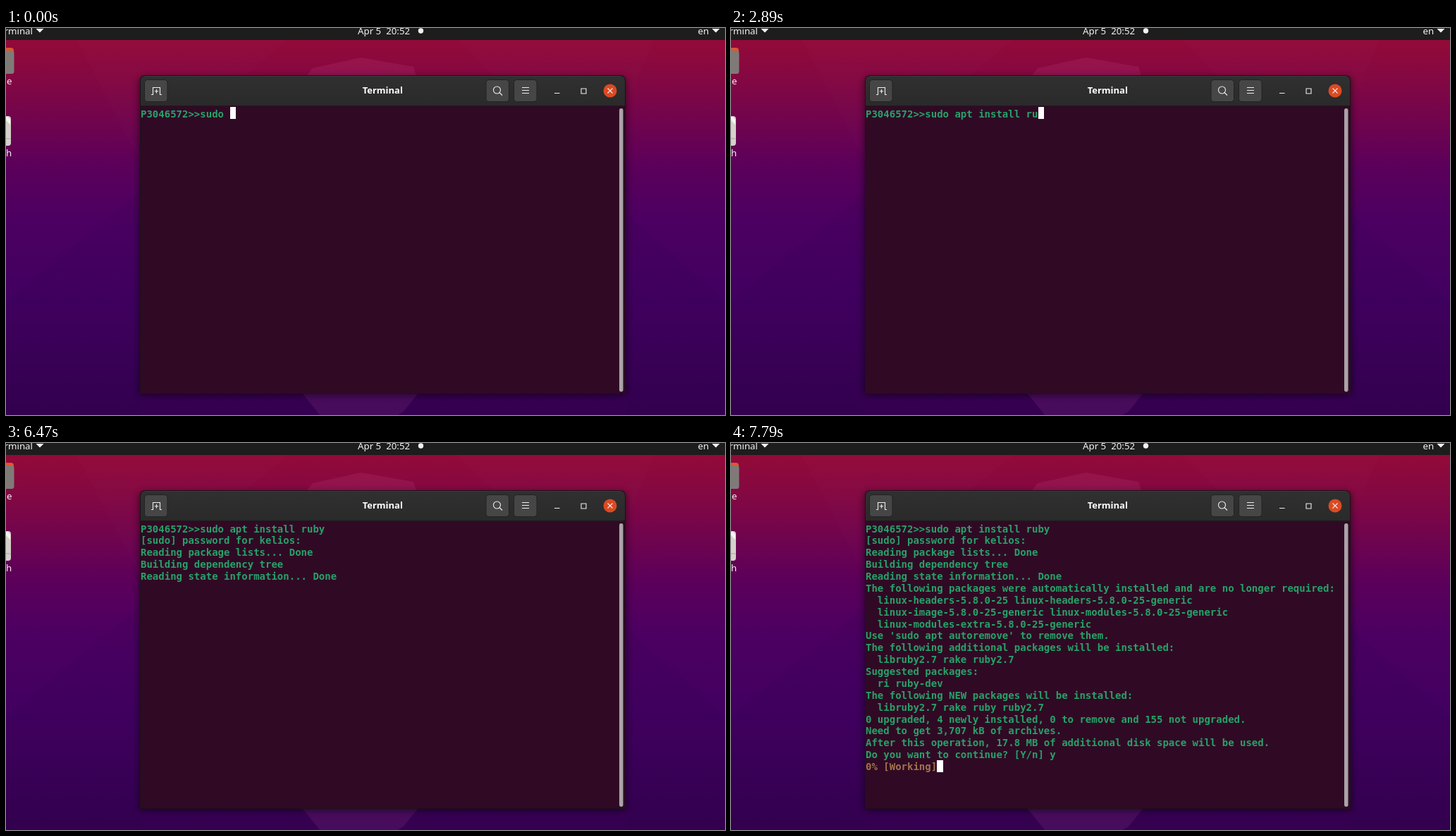
Write an HTML page with a canvas that moves like this. It is 1020 by 549 pixels and loops after 8000 ms.

```html
<!DOCTYPE html>
<html lang="en">
<head>
<meta charset="utf-8">
<title>Terminal</title>
<style>
  html, body { margin: 0; width: 100%; height: 100%; overflow: hidden; background: #34004e; }
  svg, canvas { position: absolute; left: 0; top: 0; width: 1020px; height: 549px; }
  text { font: 13.3px "Noto Sans", "Open Sans", sans-serif; fill: #f2f2f2; white-space: pre; }
  .title { font-weight: 700; font-size: 13px; fill: #fff; }
  .button { fill: #464646; stroke: #222; }
  .line { fill: none; stroke: #eee; stroke-width: 1.1; }
</style>
</head>
<body>
<svg viewBox="0 0 1020 549">
  <defs>
    <linearGradient id="sky" gradientUnits="userSpaceOnUse" x1="0" y1="17" x2="0" y2="549">
      <stop offset="0" stop-color="#930a38"/>
      <stop offset=".1" stop-color="#840842"/>
      <stop offset=".22" stop-color="#70044e"/>
      <stop offset=".34" stop-color="#5b005b"/>
      <stop offset=".48" stop-color="#4c0061"/>
      <stop offset=".68" stop-color="#420060"/>
      <stop offset="1" stop-color="#34004f"/>
    </linearGradient>
    <linearGradient id="bar" x2="0" y2="1">
      <stop offset="0" stop-color="#303030"/>
      <stop offset="1" stop-color="#2a2a2a"/>
    </linearGradient>
    <filter id="blur" x="-10%" y="-10%" width="120%" height="120%"><feGaussianBlur stdDeviation="5"/></filter>
  </defs>

  <!-- Desktop -->
  <path d="M0 0H1020V549H0Z" fill="url(#sky)"/>
  <path d="M0 388 190 232V549H0ZM880 262 1020 388V549H880Z" fill="#200050" opacity=".07"/>
  <path d="M100 17H400L340 67H190V190ZM640 17H920L880 110V67H690Z" fill="#fff" opacity=".008"/>
  <path d="M427 67 435 57 503 42 578 55 582 67 584 519 564 544 556 549H445L421 519Z" fill="#ff80c8" opacity=".095"/>

  <!-- Top bar -->
  <path d="M0 0H1020V17H0Z" fill="#1d1d1d"/>
  <text x="38" y="9" text-anchor="end">Terminal</text>
  <text x="499" y="9" xml:space="preserve">Apr 5  20:52</text>
  <text x="981.5" y="9">en</text>
  <path d="M42.5 1h11l-5.5 5.5zM1001.5 1h11l-5.5 5.5z" fill="#f2f2f2"/>
  <circle cx="588.5" cy="4" r="3.7" fill="#f2f2f2"/>

  <!-- Desktop icons -->
  <rect x="-20" y="28" width="31" height="20" rx="4" fill="#e2552c"/>
  <rect x="-20" y="32" width="31.5" height="33" rx="3.5" fill="#807a77"/>
  <text x="1" y="80">e</text>
  <rect x="-20" y="125" width="27" height="42" rx="4" fill="#d5d1cb"/>
  <path d="M0 126h3l3 4v7L0 131z" fill="#f5f4f2"/>
  <path d="M0 157H6.5" stroke="#aaa59f"/>
  <text x="0" y="181.5">h</text>

  <!-- Window -->
  <rect x="188" y="69" width="693" height="453" rx="8" fill="#000" opacity=".45" filter="url(#blur)"/>
  <path d="M190 519V75q0-8 8-8H871q8 0 8 8V519Z" fill="#1c1119"/>
  <path d="M191 111V75q0-7 7-7H871q7 0 7 7V111Z" fill="url(#bar)"/>
  <path d="M197 68.500H872" stroke="#3c3c3c"/>
  <path d="M191 110.500H878" stroke="#1b1b1b"/>
  <rect class="button" x="196.500" y="73.500" width="32.500" height="31" rx="4"/>
  <rect class="button" x="681" y="73.500" width="32.500" height="31" rx="4"/>
  <rect class="button" x="720.500" y="73.500" width="32.500" height="31" rx="4"/>
  <path class="line" d="M206 94.500H208.500V84.500H218.500V94.500H221M213.500 87V92.500M210.800 89.700H216.200"/>
  <circle class="line" cx="696.500" cy="88" r="5"/>
  <path class="line" d="M700 91.500 704 95.500M732 84.500H742M732 88.500H742M732 92.500H742M778 92.500H785.500M816 86H823V93H816Z"/>
  <text class="title" x="534.300" y="93.300" text-anchor="middle">Terminal</text>
  <circle cx="857" cy="89" r="9.500" fill="#dc4a22"/>
  <path class="line" d="M853.500 85.500 860.500 92.500M860.500 85.500 853.500 92.500"/>
</svg>
<canvas id="term" width="1020" height="549"></canvas>

<script>
const LOOP = 8000, X = 191, Y = 112.2, CELL = 8.4375, ROW = 16.875, BASELINE = 14.4;
const GREEN = "#26a269", BROWN = "#a2734c", BACK = "#300a24";
const TREE_ROW = 3, TREE_DONE = 24, WORK_ROW = 20;

const lines = `P3046572>>sudo apt install ruby
[sudo] password for kelios: 
Reading package lists... Done
Building dependency tree... 50%
Reading state information... Done
The following packages were automatically installed and are no longer required:
  linux-headers-5.8.0-25 linux-headers-5.8.0-25-generic
  linux-image-5.8.0-25-generic linux-modules-5.8.0-25-generic
  linux-modules-extra-5.8.0-25-generic
Use 'sudo apt autoremove' to remove them.
The following additional packages will be installed:
  libruby2.7 rake ruby2.7
Suggested packages:
  ri ruby-dev
The following NEW packages will be installed:
  libruby2.7 rake ruby ruby2.7
0 upgraded, 4 newly installed, 0 to remove and 155 not upgraded.
Need to get 3,707 kB of archives.
After this operation, 17.8 MB of additional disk space will be used.
Do you want to continue? [Y/n] y
0% [Working]`.split("\n");

// [time, last row, characters in it, cursor: "end" unless given]
const steps = [
  [0, 0, 15], [250, 0, 16], [400, 0, 17], [550, 0, 18], [720, 0, 19], [870, 0, 20],
  [1100, 0, 22], [1420, 0, 23], [1490, 0, 24], [1720, 0, 25], [1890, 0, 26],
  [2360, 0, 27], [2740, 0, 28], [2890, 0, 29], [3060, 0, 30], [3130, 0, 31],
  [3450, 1, 0], [3530, 1, 28, "off"], [3850, 1, 28],
  [6160, 3, 31, "home"], [6240, 5, 0], [6470, 5, 0, "off"], [6620, 14, 0, "off"],
  [6790, 19, 31], [7090, 19, 31, "off"], [7640, 19, 32], [7790, 20, 12]
];

const ctx = document.getElementById("term").getContext("2d");

function write(text, row, color) {
  ctx.fillStyle = color;
  ctx.fillText(text, X, Y + BASELINE + row * ROW);
}

function block(row, col, color) {
  const left = Math.round(X + col * CELL), top = Math.round(Y + row * ROW);
  ctx.fillStyle = color;
  ctx.fillRect(left, top, Math.round(X + (col + 1) * CELL) - left, 17);
}

function draw([, last, count, cursor = "end"]) {
  ctx.fillStyle = BACK;
  ctx.fillRect(191, 111, 687, 407);
  ctx.fillStyle = "#aaa3a8";
  ctx.beginPath();
  ctx.roundRect(870, 114, 5.5, 402, 2.75);
  ctx.fill();

  ctx.font = 'bold 14.015px "DejaVu Sans Mono", monospace';
  for (let row = 0; row <= last; row++) {
    let text = lines[row];
    if (row === last) text = text.slice(0, count);
    else if (row === TREE_ROW) text = text.slice(0, TREE_DONE);
    write(text, row, row === WORK_ROW ? BROWN : GREEN);
  }
  if (cursor === "end") block(last, count, "#fff");
  if (cursor === "home") {
    block(last, 0, GREEN);
    write(lines[last][0], last, BACK);
  }
}

const start = performance.now();
function frame() {
  const t = (performance.now() - start) % LOOP;
  draw(steps.findLast(step => step[0] <= t));
  requestAnimationFrame(frame);
}
frame();
</script>
</body>
</html>
```
